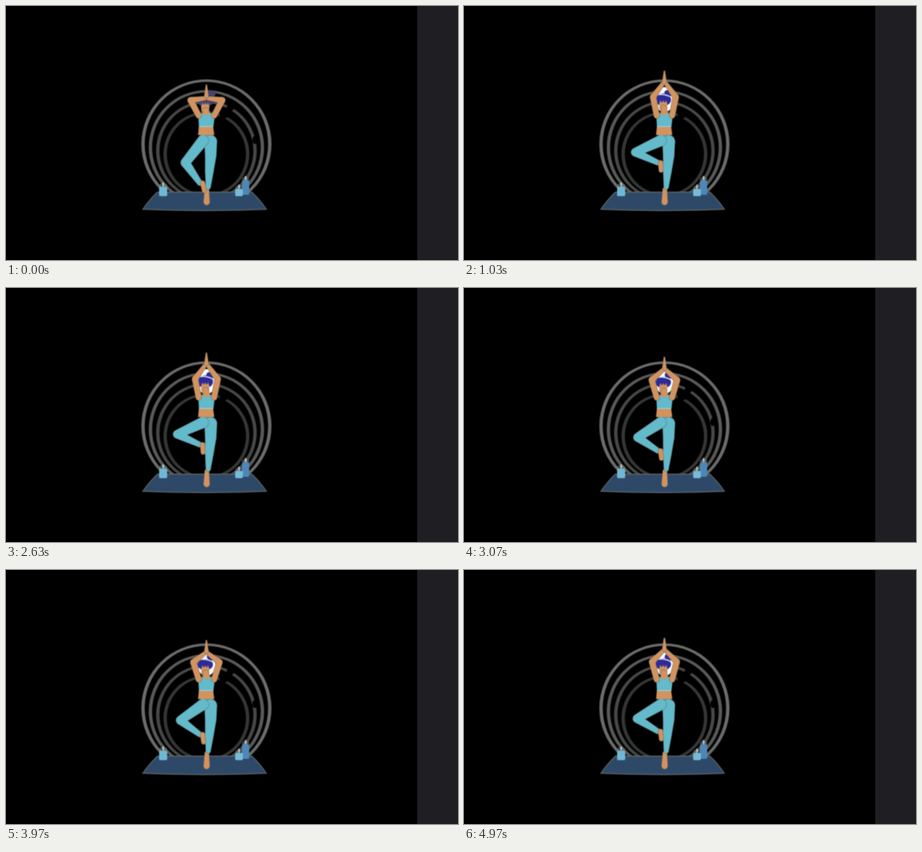
An HTML page with a canvas that plays this animation: 998 px wide and 561 px high, repeating every 5 s.

```html
<!DOCTYPE html>
<html>
<head>
<meta charset="utf-8">
<style>
html, body { margin: 0; width: 100%; height: 100%; overflow: hidden; }
body { background: linear-gradient(90deg, #000 908px, #1f1f23 908px); }
canvas { display: block; filter: blur(.8px); }
</style>
</head>
<body>
<canvas id="stage" width="998" height="561"></canvas>
<script>
const c = document.getElementById('stage').getContext('2d');
const LOOP = 5000, MID = 442.5;
const SKIN = '#d2935f', CLOTH = '#62bacb', EDGE = '#65645f';

const mix = (a, b, p) => a + (b - a) * p;

function ease(t, from, to) {
  const u = Math.max(0, Math.min(1, (t - from) / (to - from)));
  return u * u * (3 - 2 * u);
}

// 0 = foot low and hands on the head, 1 = full tree pose
const liftAt = t => ease(t, 0, 700) - ease(t, 2850, 3460) +
  ease(t, 3590, 4250) - .23 * ease(t, 4500, 5000);

function oval(x, y, rx, ry, color, tilt = 0) {
  c.fillStyle = color;
  c.beginPath();
  c.ellipse(x, y, rx, ry, tilt, 0, 7);
  c.fill();
}

function poly(color, ...pts) {
  c.fillStyle = color;
  c.beginPath();
  pts.forEach(q => c.lineTo(...q));
  c.fill();
}

// Tapered limb through joints [x, y, radius], with a thin grey rim
function limb(color, ...joints) {
  for (const [grow, fill] of [[.8, EDGE], [0, color]]) {
    joints.forEach(([x, y, r], i) => {
      oval(x, y, r + grow, r + grow, fill);
      if (!i) return;
      const [px, py, pr] = joints[i - 1];
      const a = Math.atan2(y - py, x - px) + Math.PI / 2;
      const side = (x, y, r) => [x + r * Math.cos(a), y + r * Math.sin(a)];
      poly(fill, side(px, py, pr + grow), side(x, y, r + grow),
        side(x, y, -r - grow), side(px, py, -pr - grow));
    });
  }
}

function rings(p) {
  c.save();
  c.beginPath();
  c.rect(290, 130, 300, 281);
  c.clip();
  for (let i = 0; i < 4; i++) {
    const r = 140 - 16.3 * i, y = 305 + 7.4 * i, g = 107 - 18 * i;
    // Bands are a little heavier at the sides than at the top
    c.beginPath();
    c.ellipse(MID, y, r + 3.7, r + 3, 0, 0, 7);
    c.ellipse(MID, y, r - 3.7, r - 2.5, 0, 0, 7);
    c.fillStyle = `rgb(${g}, ${g + 2}, ${g})`;
    c.fill('evenodd');
  }
  oval(480, 242, 9, 6, '#000', .4);
  if (p < .9) {
    oval(495, 225, 8, 6, '#000', .5);
    oval(549, 296, 5, 9, '#000');
  }
  c.restore();
}

function mat() {
  c.beginPath();
  c.moveTo(334, 411);
  c.lineTo(543, 411);
  c.quadraticCurveTo(561, 428, 575, 449);
  c.quadraticCurveTo(439, 455, 302, 449);
  c.quadraticCurveTo(315, 430, 334, 411);
  c.fillStyle = '#2e4968';
  c.fill();
  c.strokeStyle = '#666865';
  c.lineWidth = 1.8;
  c.stroke();
}

function candle(x, y, w, h, color) {
  const mid = x + w / 2;
  oval(mid, y - 2, w / 2, 6, 'rgba(125,135,135,.5)');
  oval(mid, y - 5, 2, 5, '#b9c5c4');
  c.fillStyle = color;
  c.beginPath();
  c.roundRect(x, y, w, h, 3);
  c.fill();
}

function legs(p) {
  const drop = 45 * (1 - p);
  const knee = [mix(396, 378, p), mix(346, 323, p), mix(10, 9, p)];
  limb(SKIN, [443.5, 405, 4.5], [443, 433, 6.5]);
  limb(CLOTH, [434, 295, 10], [453, 296, 10]);
  limb(CLOTH, [452, 299, 13.5], [452, 330, 12], [449, 365, 9], [446.5, 400, 5]);
  limb(CLOTH, [435, 297, 12], knee, [428, 346 + drop, 5.5]);
  limb(SKIN, [434, 346 + drop, 5], [mix(438, 435, p), 363 + drop, 4.5]);
}

function torso() {
  limb(SKIN, [428, 243, 6], [457, 243, 6]);
  poly(SKIN, [426, 264], [457, 264], [460, 285], [424, 285]);
  poly(CLOTH, [427, 237], [459, 237], [460, 250], [458, 267], [426, 267], [425, 250]);
  oval(MID, 236, 8, 5, SKIN);
  poly('#9bd0d8', [426, 265], [458, 265], [458, 267], [426, 267]);
}

function head(p) {
  const shine = ease(p, .2, .6), y = mix(212, 207, p);
  const hair = `rgb(${mix(72, 44, shine)}, ${mix(66, 42, shine)}, ${mix(110, 150, shine)})`;
  c.globalAlpha = shine;
  oval(MID, y, 20, mix(21, 28, p), '#fff');
  c.globalAlpha = 1;
  oval(mix(454, 451, p), 193, 9, 7, hair, .4);
  oval(440, y, 17, mix(10, 14, p), hair);
  c.lineWidth = 2.5;
  c.strokeStyle = `rgba(235, 235, 250, ${mix(.4, .95, shine)})`;
  c.beginPath();
  c.moveTo(428, y - 11);
  c.quadraticCurveTo(444, y - 14, 460, y - 4);
  c.stroke();
  // Face under a jagged fringe
  oval(440, y + 16, 9, 11, SKIN);
  for (let x = 434; x < 450; x += 6) poly(SKIN, [x - 4, y + 12], [x, y + 1], [x + 4, y + 12]);
  limb(SKIN, [441, y + 18, 6], [MID, 236, 7]);
}

function arms(p) {
  const tip = mix(175, 144, p);
  for (const s of [-1, 1]) {
    const elbow = [MID + s * mix(35, 25, p), mix(208, 201, p), 6.5];
    limb(SKIN, [MID + s * 17, 242, 6], elbow, [MID + s * 4, mix(204, 172, p), 4]);
  }
  limb(SKIN, [MID, tip, 1], [MID, tip + 24, 4.5]);
}

function draw() {
  const p = liftAt(performance.now() % LOOP);
  c.clearRect(0, 0, 998, 561);
  rings(p);
  mat();
  candle(338, 399, 18, 21, '#70b7d5');
  candle(521, 385, 16, 32, '#4c87b9');
  candle(506, 404, 17, 16, '#77bbd8');
  legs(p);
  head(p);
  torso();
  arms(p);
  requestAnimationFrame(draw);
}
draw();
</script>
</body>
</html>
```
